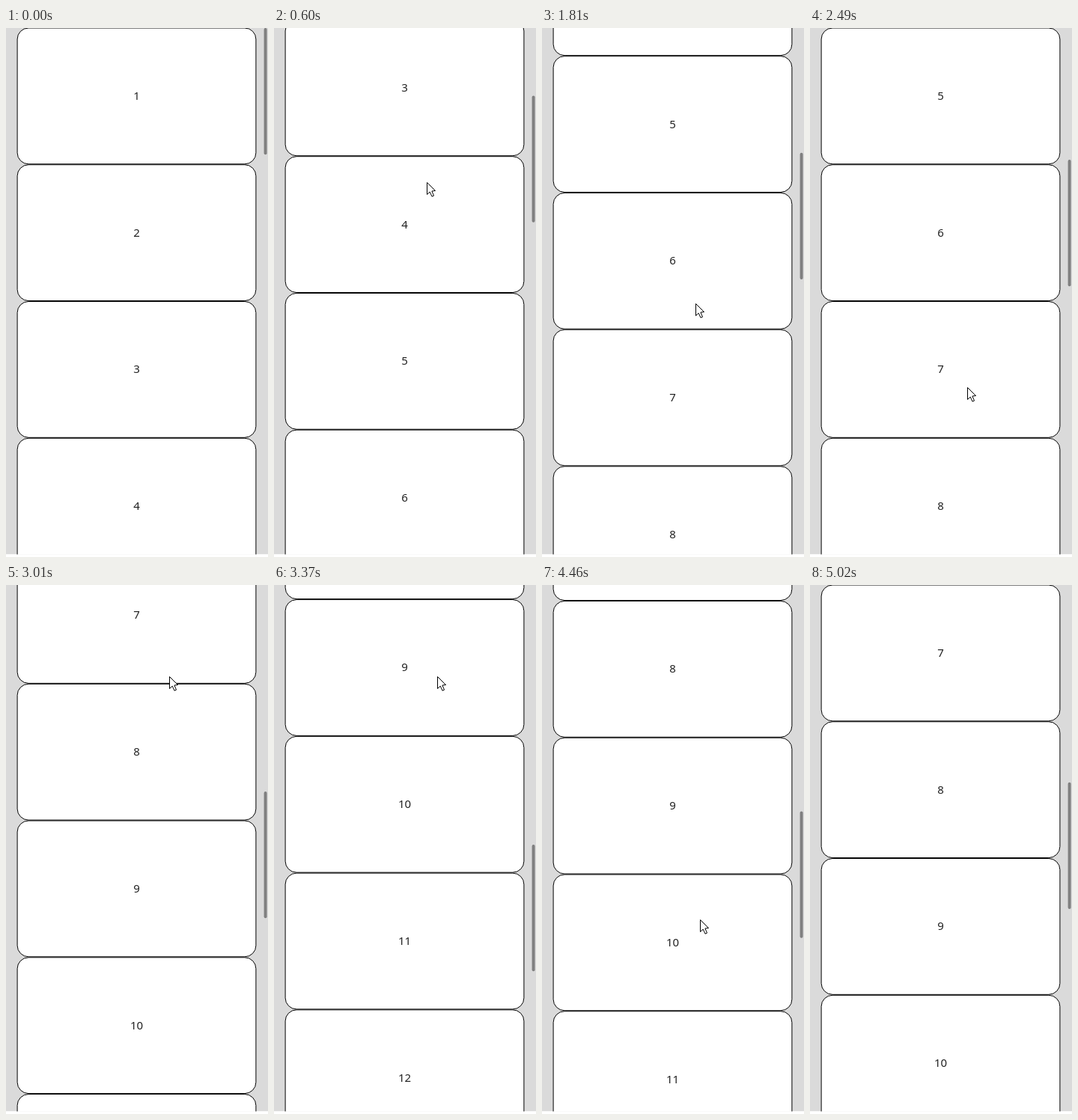
An HTML page with a canvas for the animation above (6.18 s loop, 350x707 px).

```html
<!DOCTYPE html>
<html lang="en">
<head>
<meta charset="utf-8">
<title>Snapping list</title>
<style>
  html, body { margin: 0; width: 100%; height: 100%; overflow: hidden; background: #fff; }
  canvas { display: block; }
</style>
</head>
<body>
<canvas id="stage" width="350" height="707"></canvas>
<script>
const ctx = document.getElementById('stage').getContext('2d');
const LOOP = 6180, VIEW = 703.5, PITCH = 182.75, COUNT = 16;
const snap = cards => cards * PITCH;

const linear = p => p;
const pull = p => p * p;
const settle = p => 1 - (1 - p) ** 4;
const glide = p => p * p * (3 - 2 * p);

// Each key: time, value(s), easing used to reach it
const scrollKeys = [
  [0, [0]], [200, [0]],
  [545, [272], pull], [1440, [snap(4)], settle],
  [1690, [snap(4)]], [1950, [snap(4) - 84], glide], [2250, [snap(4)], settle],
  [2690, [snap(4)]], [2980, [snap(4) + 358], pull], [3730, [snap(8)], settle],
  [3890, [1394]], [4050, [1325], settle],
  [4340, [1325]], [4480, [1235], pull], [4940, [snap(6)], settle]
];
const cursorKeys = [
  [120, [214, 560]], [200, [210, 480]],
  [545, [204, 206], pull], [640, [204, 206]], [1280, [202, 330], glide],
  [1690, [202, 330]], [1950, [208, 414], glide],
  [2290, [208, 414]], [2490, [210, 480], glide],
  [2690, [210, 480]], [2980, [218, 122], pull],
  [3450, [218, 122]], [3730, [219, 243], pull], [3890, [220, 311]], [4050, [220, 380], settle],
  [4340, [220, 380]], [4480, [208, 470], pull], [4900, [190, 474]],
  [4940, [166, 478]], [4980, [42, 610]]
];

function track(keys, t) {
  const next = keys.findIndex(key => key[0] > t);
  if (next < 0) return keys[keys.length - 1][1];
  if (next === 0) return keys[0][1];
  const [t0, from] = keys[next - 1];
  const [t1, to, ease = linear] = keys[next];
  const p = ease((t - t0) / (t1 - t0));
  return from.map((v, i) => v + (to[i] - v) * p);
}

function roundedRect(x, y, w, h, r) {
  ctx.beginPath();
  ctx.roundRect(x, y, w, h, r);
}

function drawCard(number, y) {
  roundedRect(15.1, y, 318.8, 181.8, 15);
  ctx.fillStyle = '#fff';
  ctx.fill();
  ctx.strokeStyle = '#000';
  ctx.lineWidth = 1;
  ctx.stroke();
  ctx.fillStyle = '#222';
  ctx.fillText(number, 174.5, y + 95.9);
}

function drawCursor(x, y) {
  ctx.save();
  ctx.translate(Math.round(x) + 0.5, Math.round(y) + 0.5);
  ctx.beginPath();
  ctx.moveTo(0, 0);
  for (const [px, py] of [[0, 16], [3.7, 12.6], [6.5, 18.7], [9, 17.6], [6.4, 11.5], [11, 11]]) ctx.lineTo(px, py);
  ctx.closePath();
  ctx.fillStyle = '#fff';
  ctx.fill();
  ctx.strokeStyle = '#000';
  ctx.lineWidth = 1;
  ctx.stroke();
  ctx.restore();
}

function draw(t) {
  const [scroll] = track(scrollKeys, t);
  ctx.fillStyle = '#fff';
  ctx.fillRect(0, 0, 350, 707);

  ctx.save();
  ctx.beginPath();
  ctx.rect(0, 0, 350, VIEW);
  ctx.clip();
  ctx.fillStyle = '#dadada';
  ctx.fillRect(0, 0, 350, VIEW);
  ctx.font = '15px "Noto Sans", sans-serif';
  ctx.textAlign = 'center';
  for (let i = 0; i < COUNT; i++) {
    const y = i * PITCH - scroll;
    if (y > -PITCH && y < VIEW) drawCard(i + 1, y);
  }
  const ratio = VIEW / (COUNT * PITCH);
  roundedRect(344.6, scroll * ratio, 4, VIEW * ratio, 2);
  ctx.fillStyle = '#808080';
  ctx.fill();
  ctx.restore();

  if (t >= 120 && t < 5020) drawCursor(...track(cursorKeys, t));
}

const start = performance.now();
function tick() {
  draw((performance.now() - start) % LOOP);
  requestAnimationFrame(tick);
}
tick();
</script>
</body>
</html>
```
